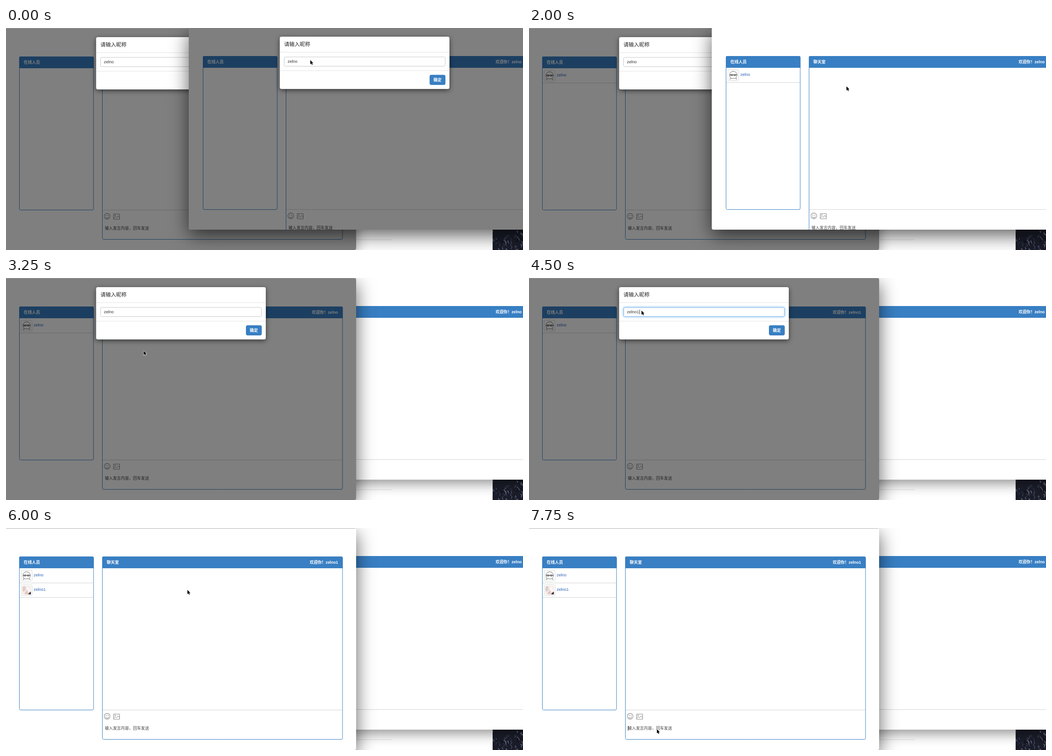
An HTML page with a canvas for the animation above (8000 ms loop, 1140 px wide and 491 px high).

```html
<!DOCTYPE html>
<html lang="zh">
<head>
<meta charset="utf-8">
<title>聊天室</title>
<style>
html, body { margin: 0; width: 100%; height: 100%; overflow: hidden; background: #fff; }
canvas { display: block; width: 1140px; height: 491px; }
</style>
</head>
<body>
<canvas id="stage" width="1140" height="491"></canvas>
<script>
const ctx = document.getElementById('stage').getContext('2d');
const LOOP = 8000, STEP = 250;
const BLUE = '#387fc3', LINK = '#2b63b4', USER = 'zelno';
const FACE = '"Liberation Sans", "Noto Sans CJK SC", "Noto Sans CJK", sans-serif';

// Pointer path: time, x, y
const PATH = [
  [0, 671, 71], [500, 671, 71], [1250, 955, 118], [1750, 958, 119],
  [2000, 700, 129], [2250, 420, 145], [2500, 345, 157], [2750, 303.5, 161],
  [3250, 303.5, 161], [3750, 262, 132], [4000, 248, 72], [4750, 248, 72],
  [5250, 520, 114], [5750, 536, 118], [6000, 400, 137], [6250, 286, 148],
  [6500, 286, 150], [7000, 282, 445], [8000, 282, 445]
];

function pointerAt(t) {
  const i = PATH.findIndex(p => p[0] > t);
  const [t0, x0, y0] = PATH[i - 1], [t1, x1, y1] = PATH[i];
  const k = (t - t0) / (t1 - t0), e = k * k * (3 - 2 * k);
  return [x0 + (x1 - x0) * e, y0 + (y1 - y0) * e];
}

function rect(x, y, w, h, fill) {
  ctx.fillStyle = fill;
  ctx.fillRect(x, y, w, h);
}

function box(x, y, w, h, r, fill, stroke, width = 1) {
  ctx.beginPath();
  ctx.roundRect(x, y, w, h, r);
  if (fill) { ctx.fillStyle = fill; ctx.fill(); }
  if (stroke) { ctx.strokeStyle = stroke; ctx.lineWidth = width; ctx.stroke(); }
}

function line(points, stroke, width = 1) {
  ctx.beginPath();
  points.forEach(([x, y]) => ctx.lineTo(x, y));
  ctx.strokeStyle = stroke;
  ctx.lineWidth = width;
  ctx.stroke();
}

function poly(points, fill) {
  ctx.beginPath();
  points.forEach(([x, y]) => ctx.lineTo(x, y));
  ctx.closePath();
  ctx.fillStyle = fill;
  ctx.fill();
}

function arc(x, y, r, from = 0, to = Math.PI * 2) {
  ctx.beginPath();
  ctx.arc(x, y, r, from, to);
}

function text(str, x, y, color, { size = 9, bold = false, align = 'left' } = {}) {
  ctx.font = `${bold ? 'bold ' : ''}${size}px ${FACE}`;
  ctx.textAlign = align;
  ctx.fillStyle = color;
  ctx.fillText(str, x, y);
}

function withShadow(color, blur, dy, draw) {
  ctx.save();
  ctx.shadowColor = color;
  ctx.shadowBlur = blur;
  ctx.shadowOffsetY = dy;
  draw();
  ctx.restore();
}

function photo() {
  let seed = 11;
  const rnd = () => (seed = seed * 16807 % 2147483647) / 2147483647;
  ctx.save();
  ctx.beginPath();
  ctx.rect(1073, 446, 67, 45);
  ctx.clip();
  rect(1073, 446, 67, 45, '#1b1d29');
  for (let i = 0; i < 46; i++) {
    const x = 1073 + rnd() * 67, y = 448 + rnd() * 43, n = 3 + rnd() * 8;
    const shade = ['#4c566e', '#67718a', '#30384c', '#0f1019'][i % 4];
    line([[x, y], [x + n * 0.4, y + n * 0.5], [x + n * (rnd() - 0.3), y + n]], shade, 0.7 + rnd() * 1.4);
  }
  ctx.restore();
}

function sketchAvatar(x, y) {
  ctx.strokeStyle = '#555';
  ctx.lineWidth = 0.9;
  arc(x + 12.5, y + 12, 8.2, 2.5, 6.9);
  ctx.stroke();
  line([[x + 4, y + 11.5], [x + 21, y + 11.5]], '#444', 1);
  box(x + 6.5, y + 10.5, 5, 3, 1.4, '#999', '#444', 0.8);
  box(x + 13.5, y + 10.5, 5, 3, 1.4, '#999', '#444', 0.8);
  line([[x + 6, y + 17], [x + 8.5, y + 19.5], [x + 16.5, y + 19.5], [x + 19, y + 17]], '#666', 0.9);
  line([[x + 6.5, y + 18], [x + 4.5, y + 21.5], [x + 8, y + 20]], '#777', 0.8);
  line([[x + 18.5, y + 18], [x + 20.5, y + 21.5], [x + 17, y + 20]], '#777', 0.8);
}

function photoAvatar(x, y) {
  rect(x + 3, y + 3, 19, 19, '#f4ebe9');
  poly([[x + 3, y + 5], [x + 9, y + 3], [x + 11, y + 11], [x + 6, y + 16], [x + 3, y + 14]], '#dfcfcb');
  poly([[x + 12, y + 7], [x + 18, y + 5], [x + 21, y + 13], [x + 15, y + 17]], '#fbf7f6');
  poly([[x + 9, y + 17], [x + 14, y + 12], [x + 17, y + 22], [x + 8, y + 22]], '#e3c9c3');
  poly([[x + 22, y + 16], [x + 22, y + 22], [x + 16, y + 22], [x + 18, y + 18]], '#473f42');
}

function member(i, name) {
  const y = 93 + i * 32;
  box(33.5, y + 0.5, 24, 24, 3, '#fff', '#d5d5d5');
  (i ? photoAvatar : sketchAvatar)(33, y);
  text(name, 61, y + 14.3, LINK);
  rect(30, y + 28, 163, 1, '#d2d2d2');
}

function panel(x, y, w, h, title) {
  box(x + 0.5, y + 0.5, w - 1, h - 1, 3, '#fff', BLUE);
  box(x, y, w, 26, [3, 3, 0, 0], BLUE);
  text(title, x + 10, y + 16.2, '#fff', { bold: true });
}

function tools() {
  ctx.strokeStyle = '#888';
  ctx.lineWidth = 1.1;
  arc(223, 416.5, 6.4);
  ctx.stroke();
  arc(223, 417, 3.5, 0.3, Math.PI - 0.3);
  ctx.stroke();
  rect(220, 414, 1.6, 1.8, '#888');
  rect(224.4, 414, 1.6, 1.8, '#888');
  box(237.2, 411.5, 13.2, 11.5, 0.5, null, '#888', 1.1);
  line([[237.5, 421], [241, 417.5], [243.5, 420], [247, 415.5], [250, 419]], '#888');
  arc(240.7, 414.7, 1.1);
  ctx.stroke();
}

function modal({ name, focus, pressed, caret }) {
  withShadow('rgba(0,0,0,.55)', 11, 3, () => box(198.5, 20, 374.5, 116, 4, '#fff'));
  box(198.5, 20, 374.5, 116, 4, null, 'rgba(0,0,0,.2)', 0.8);
  text('请输入昵称', 208.3, 41.4, '#222', { size: 11.5 });
  rect(199, 54, 374, 1, '#e3e3e3');
  rect(199, 95, 374, 1, '#e3e3e3');

  const edge = pressed ? '#a3c3e0' : focus ? '#74b0e6' : '#c6c6c6';
  const input = () => box(208.5, 65, 355, 20.5, 3, '#fff', edge);
  if (focus && !pressed) withShadow('rgba(102,175,233,.6)', 5, 0, input);
  else input();
  text(name, 216, 78.3, '#333');
  if (caret) rect(217 + ctx.measureText(name).width, 70, 1, 10, '#333');

  if (pressed) box(528.8, 104.3, 35.4, 23, 3, null, '#6daaf0', 2);
  box(529.5, 105, 34, 21.5, 3, pressed ? '#2665a8' : BLUE, pressed ? '#1f548c' : '#3274b5', 0.8);
  text('确定', 546.5, 119.2, '#fff', { bold: true, align: 'center' });
}

// Both windows share one layout, given in the left window's coordinates
function chatWindow(s) {
  ctx.save();
  ctx.translate(s.x, s.y);
  const shape = () => box(-2, 0, 774, s.h, 4, '#fff');
  if (s.active) withShadow('rgba(0,0,0,.62)', 40, 13, shape);
  else withShadow('rgba(0,0,0,.42)', 28, 9, shape);
  ctx.beginPath();
  ctx.roundRect(-2, 0, 774, s.h, 4);
  ctx.clip();

  panel(29, 63, 164.5, 340, '在线人员');
  s.members.forEach((name, i) => member(i, name));

  panel(212, 63, 530.5, 405, '聊天室');
  text('欢迎你！' + s.name, 732.2, 79.2, '#fff', { bold: true, size: 8.8, align: 'right' });
  rect(213, 402, 529, 1, '#d2d2d2');
  tools();
  text('输入发言内容，回车发送', 218, 446.2, '#444', { size: 8.85 });
  if (s.chatCaret) rect(218, 438, 1, 10, '#222');

  if (s.open) {
    rect(-2, 0, 774, s.h, 'rgba(0,0,0,.5)');
    modal(s);
  }
  rect(-2, 0, 774, 1, s.open ? '#999' : '#aaa');
  ctx.restore();
}

function pointer(x, y) {
  ctx.save();
  ctx.translate(x, y);
  const tip = [[0, 0], [0, 9.2], [2.1, 7.3], [3.6, 10.6], [5.2, 9.9], [3.8, 6.7], [6.5, 6.5]];
  ctx.lineJoin = 'round';
  line([...tip, [0, 0]], '#fff', 1.4);
  poly(tip, '#000');
  ctx.restore();
}

function draw(t) {
  const within = (a, b) => t >= a && t < b;
  const blink = start => Math.floor((t - start) / 500) % 2 === 0;
  const leftActive = t >= 2750;
  const name = t >= 4500 ? USER + '1' : USER;

  const left = {
    x: 0, y: 0, h: 491, name, active: leftActive,
    members: t >= 6000 ? [USER, name] : t >= 1750 ? [USER] : [],
    open: t < 6000,
    focus: within(4250, 6000),
    pressed: within(5750, 6000),
    caret: within(4250, 5750) && blink(4250),
    chatCaret: t >= 7000 - 250 && blink(6750)
  };
  const right = {
    x: 405, y: -1, h: 447, name: USER, active: !leftActive,
    members: t >= 2000 ? [USER] : [],
    open: t < 2000,
    focus: within(500, 2000),
    pressed: within(1750, 2000),
    caret: within(500, 1750) && blink(500)
  };

  rect(0, 0, 1140, 491, '#fff');
  rect(772, 467.5, 79, 1, '#e2e2e2');
  photo();
  (leftActive ? [right, left] : [left, right]).forEach(chatWindow);
  pointer(...pointerAt(t));
}

function tick(now) {
  draw(Math.floor(now % LOOP / STEP) * STEP);
  requestAnimationFrame(tick);
}
requestAnimationFrame(tick);
</script>
</body>
</html>
```
